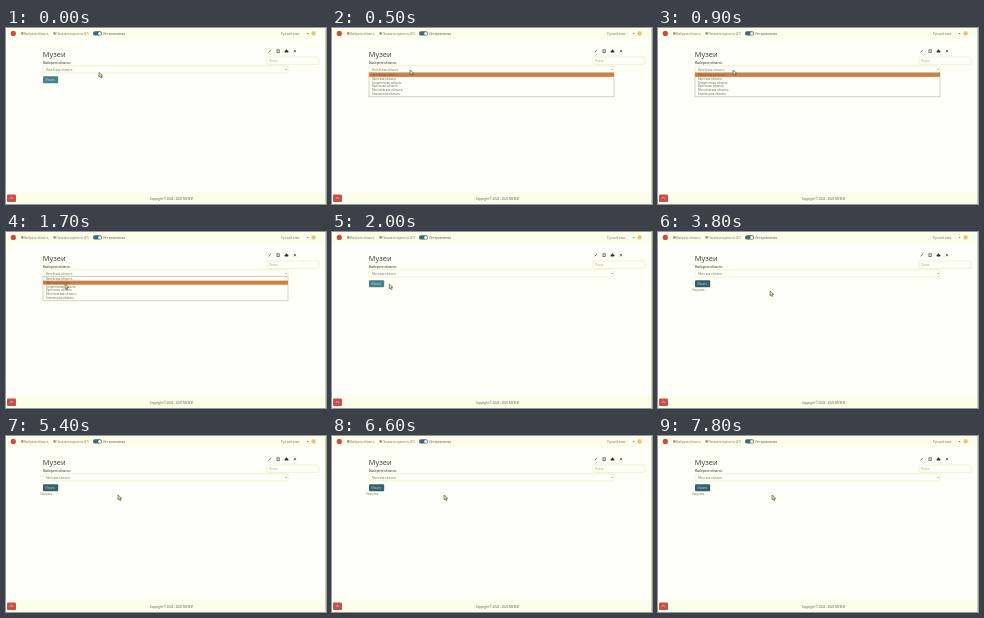
Write an HTML page that moves like this. It is 320 by 176 pixels and loops after 8 s.

```html
<!DOCTYPE html>
<html lang="ru">
<head>
<meta charset="utf-8">
<title>Музеи</title>
<style>
  html, body { margin: 0; width: 100%; height: 100%; overflow: hidden; background: #fffffa; }
  svg { display: block; width: 100vw; height: 100vh; }
  text { font-family: "Open Sans", "Noto Sans", sans-serif; font-size: 2.9px; fill: #74744f; }
</style>
</head>
<body>
<svg viewBox="0 0 320 176">
  <rect width="320" height="176" fill="#fffffa"/>

  <g id="navbar">
    <rect width="320" height="11" fill="#fdfdeb"/>
    <circle cx="7.3" cy="5.4" r="2.6" fill="#cf4a43"/>
    <rect x="15.2" y="4.3" width="2.2" height="2.2" fill="#858560"/>
    <text x="18.2" y="6.7">Выбрать область</text>
    <rect x="47.5" y="4.3" width="2.2" height="2.2" fill="#858560"/>
    <text x="50.5" y="6.7">Показать музеи на (47)</text>
    <rect x="87" y="3.2" width="9" height="4.4" rx="2.2" fill="#3d6878"/>
    <circle cx="93.7" cy="5.4" r="1.5" fill="#fffffa"/>
    <text x="97.3" y="6.7" style="fill:#555544">Интерактивная</text>
    <text x="275" y="6.7">Русский язык</text>
    <path d="M300.6 5h2l-1 1.2z" fill="#77775c"/>
    <circle cx="307.6" cy="5.4" r="2.2" fill="#e8c184"/>
  </g>

  <text x="36.8" y="28.8" style="font-size:7.4px;font-weight:500;fill:#3c3c2c">Музеи</text>
  <text x="37" y="35.8" style="font-weight:600;fill:#4c4c38">Выберите область:</text>

  <g id="sidebar">
    <g fill="none" stroke="#55553f" stroke-width=".8">
      <path d="M262.6 24.4l2.3-2.5"/>
      <rect x="271" y="21.8" width="2.2" height="2.6"/>
      <path d="M288 22l2 2.2M288 24.4l1.8-2.5"/>
    </g>
    <path d="M278.8 23.2l1.7-1.9 1.7 1.9v1.4h-3.4z" fill="#303025"/>
    <rect x="261" y="29" width="52" height="7.3" rx="1" fill="#fffffa" stroke="#e6e6b8" stroke-width=".6"/>
    <text x="263" y="33.7" style="fill:#a0a083">Поиск</text>
  </g>

  <rect x="37" y="37.8" width="245" height="7.2" rx="1" fill="#fffffa" stroke="#e6e6b8" stroke-width=".6"/>
  <text id="choice" x="40" y="42.6"></text>
  <path d="M279 40.9l1 1 1-1" fill="none" stroke="#66664e" stroke-width=".5"/>

  <rect id="button" x="37" y="48.2" width="15.2" height="7" rx="1"/>
  <text x="39.5" y="52.8" style="fill:#d4e2dc">Искать</text>
  <text id="loading" x="34" y="59">Загрузка...</text>

  <g id="menu">
    <rect x="37" y="44.6" width="245" height="24.2" fill="#fffffa" stroke="#b5b594" stroke-width=".6"/>
    <rect id="highlight" x="37" width="245" height="4.1" fill="#cf8143"/>
    <g id="items"></g>
  </g>

  <g id="footer">
    <rect y="164" width="320" height="12" fill="#fdfdeb"/>
    <text x="165.3" y="171.8" text-anchor="middle" style="fill:#55554a">Copyright © 2024 - 2025 МУЗЕИ</text>
    <rect x="1" y="166.5" width="9" height="7.6" rx="1" fill="#c6504b"/>
    <path d="M4 170.8l1.5-1.6 1.5 1.6" fill="none" stroke="#fff4e8" stroke-width=".6"/>
  </g>
  <path d="M319.5 0v176" stroke="#d2d2b8"/>

  <path id="cursor" d="M0 0v4.7l1.1-1 .9 1.9 1-.5-.9-1.8h1.6z" fill="#efeab0" stroke="#45453a" stroke-width=".6"/>
</svg>
<script>
const DURATION = 8000;
const STEP = 100;
const ROW = 3.82;
const regions = ["Витебская", "Минская", "Гродненская", "Брестская", "Могилевская", "Гомельская"]
  .map(name => name + " область");

// time, x, y of the pointer tip
const path = [
  [0, 93, 44.5], [500, 78, 42], [900, 75, 42], [1200, 66, 47], [1400, 63, 49.5],
  [1700, 59, 52], [2200, 56, 52], [2600, 47, 51], [2800, 47.5, 52],
  [3100, 85, 66], [3400, 112, 59], [6900, 112, 59], [7400, 114, 59], [DURATION, 114, 59]
];

const el = id => document.getElementById(id);
const [choice, button, loading, menu, highlight, items, cursor] =
  ["choice", "button", "loading", "menu", "highlight", "items", "cursor"].map(el);

const labels = regions.map((name, i) => {
  const label = document.createElementNS("http://www.w3.org/2000/svg", "text");
  label.setAttribute("x", 40);
  label.setAttribute("y", 47.9 + i * ROW);
  label.textContent = name;
  return items.appendChild(label);
});

function pointerAt(t) {
  const i = path.findIndex(point => point[0] > t);
  const [t0, x0, y0] = path[i - 1];
  const [t1, x1, y1] = path[i];
  const k = (t - t0) / (t1 - t0);
  return [x0 + (x1 - x0) * k, y0 + (y1 - y0) * k];
}

const show = (node, visible) => node.setAttribute("visibility", visible ? "visible" : "hidden");

function render(time) {
  const t = Math.floor((time % DURATION) / STEP) * STEP;
  const [x, y] = pointerAt(t);
  const row = y > 49 ? 1 : 0;
  const open = t >= 400 && t < 2000;

  cursor.setAttribute("transform", `translate(${x} ${y})`);
  show(menu, open);
  highlight.setAttribute("y", 44.8 + row * ROW);
  labels.forEach((label, i) => label.style.fill = i === row ? "#8c4e28" : "#66664f");
  choice.textContent = regions[t < 2000 ? 0 : 1];
  button.setAttribute("fill", t < 2400 ? "#44818a" : "#35616a");
  show(loading, t >= 2600);
}

function tick(now) {
  render(now);
  requestAnimationFrame(tick);
}
render(0);
requestAnimationFrame(tick);
</script>
</body>
</html>
```
